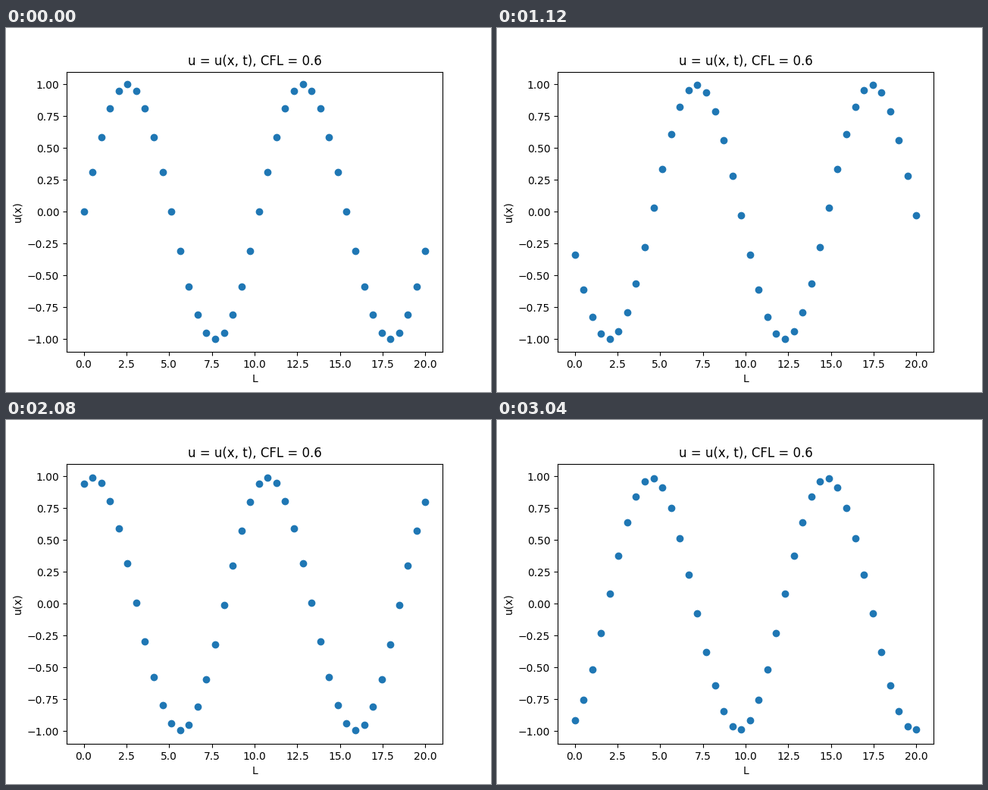
These frames come from a looping animation (640 px wide and 480 px high, 3200 ms). A matplotlib script:

```python
import math

import numpy as np
import matplotlib.pyplot as plt
from matplotlib.animation import FuncAnimation

LENGTH = 20.0
POINTS = 40
CFL = 0.6
FRAMES = 20
INTERVAL = 160

# Phase advance and damping per step of a Lax-Wendroff scheme on a sine wave
THETA = 2 * math.pi / 20
FACTOR = complex(1 - 2 * (CFL * math.sin(THETA / 2)) ** 2,
                 -CFL * math.sin(THETA))

cells = np.arange(POINTS)
x = np.linspace(0, LENGTH, POINTS)


def step_count(frame):
    """Solver steps done: two per frame, with an extra one every 13 frames."""
    return math.ceil(27 * frame / 13)


def solution(steps):
    return np.imag(FACTOR ** steps * np.exp(1j * THETA * cells))


fig, ax = plt.subplots(figsize=(6.4, 4.8), dpi=100)
dots, = ax.plot(x, solution(0), "o", color="#1f77b4")
ax.set_xlim(-1, 21)
ax.set_ylim(-1.1, 1.1)
ax.set_xlabel("L")
ax.set_ylabel("u(x)")
ax.set_title(f"u = u(x, t), CFL = {CFL}")


def update(frame):
    dots.set_ydata(solution(step_count(frame)))
    return dots,


anim = FuncAnimation(fig, update, frames=FRAMES, interval=INTERVAL,
                     init_func=lambda: update(0), repeat=True, repeat_delay=0)
plt.show()
```
